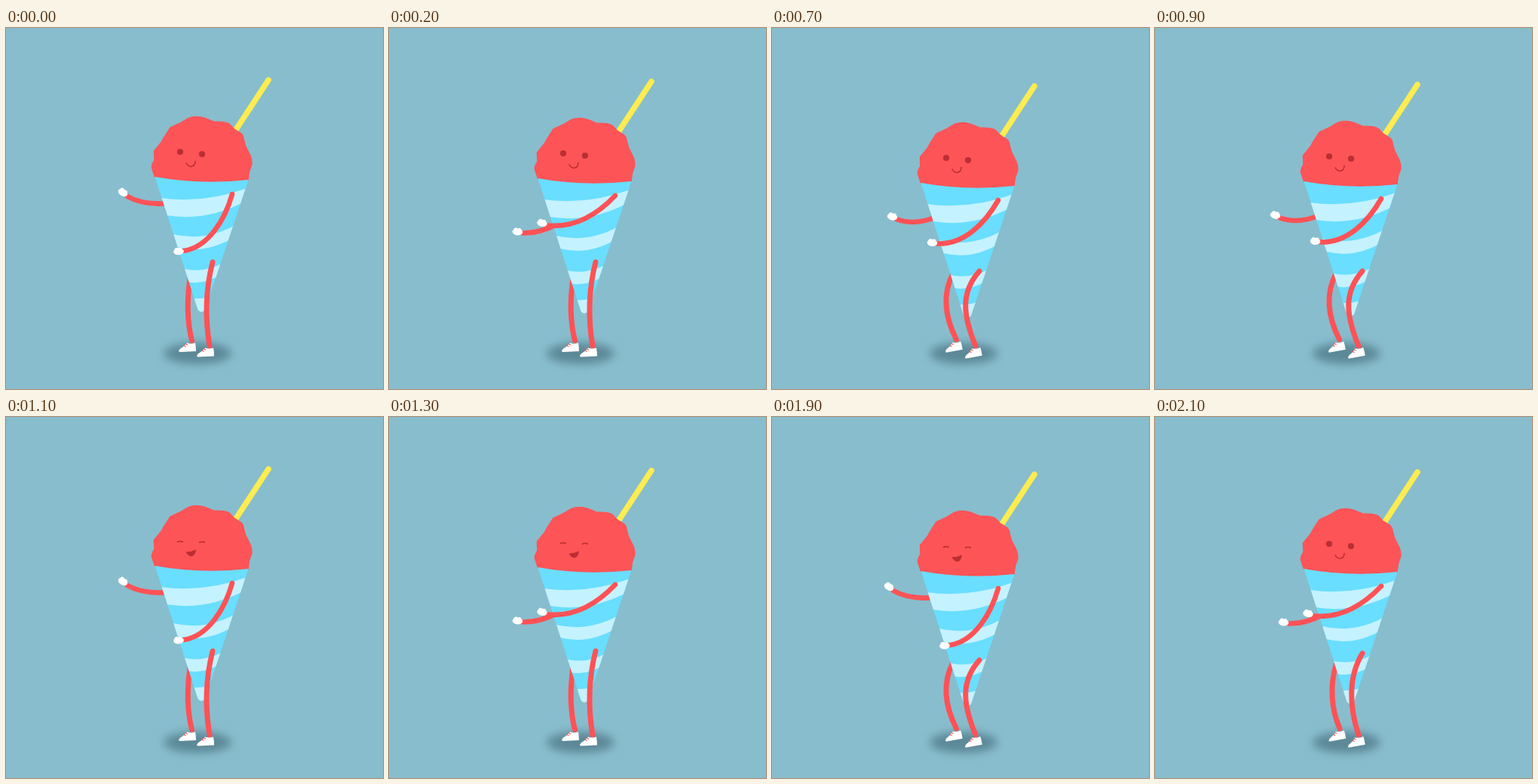
These frames come from a looping animation (500 px wide and 478 px high, 2200 ms). An HTML page:

```html
<!DOCTYPE html>
<html lang="en">
<head>
<meta charset="utf-8">
<title>Dancing snow cone</title>
<style>
  html, body { margin: 0; width: 100%; height: 100%; overflow: hidden; background: #88bdcd; }
  svg { display: block; width: 100vw; height: 100vh; }
  .limb { fill: none; stroke: #fe5256; stroke-width: 7; stroke-linecap: round; }
  .arm { stroke-width: 6.6; }
  .stripe { fill: #c5f2ff; }
  .line { fill: none; stroke: #b92d33; stroke-width: 1.5; stroke-linecap: round; }
  .dark { fill: #b92f34; }
</style>
</head>
<body>
<svg viewBox="0 0 500 478" preserveAspectRatio="none">
  <defs>
    <filter id="soft" x="-30%" y="-80%" width="160%" height="260%"><feGaussianBlur stdDeviation="6"/></filter>
    <clipPath id="coneShape"><path id="cone" d="M197.5 197Q258 208 321.5 201L264 373Q259 379 254.5 373Z"/></clipPath>
    <g id="hand" fill="#fff">
      <ellipse rx="6.8" ry="4.5"/>
      <circle cx="-2.5" cy="-2.5" r="2.8"/>
      <circle cx="2.3" cy="-2.7" r="2.4"/>
    </g>
    <g id="shoe">
      <path fill="#fff" d="M4 2Q5 7 5 13L-16 14C-19 14 -18 11 -15 9C-11 7 -9 4 -7 2Q-2 4 4 2Z"/>
      <path d="M-11.5 5l3 2M-9 3l3 2" fill="none" stroke="#fe5256" stroke-width="1.2"/>
    </g>
  </defs>

  <rect width="500" height="478" fill="#88bdcd"/>
  <ellipse cx="254" cy="431" rx="45" ry="14" fill="#5c8897" filter="url(#soft)"/>

  <path id="farLeg" class="limb"/>
  <use id="farShoe" href="#shoe"/>

  <g id="body">
    <path id="farArm" class="limb arm"/>
    <use id="farHand" href="#hand"/>
    <path d="M302 139L348 69" fill="none" stroke="#ffec50" stroke-width="7.6" stroke-linecap="round"/>
    <path fill="#fd5457" stroke="#fd5457" stroke-width="1.5" stroke-linejoin="round"
      d="M197.5 197L193.5 185Q193 181 197 175L196.5 163L203 155Q207 151 209 146L218 132L232 125.500L242 119.500Q252 115.500 264 119.500L275 124L286 124.500Q294 125 297 128L303 134.500L312 140Q315 143 315 147L317.500 156L324 169Q326 174 326 180L322.500 190L321 201Q258 208 197.500 197Z"/>
    <g id="awake">
      <circle class="dark" cx="231" cy="164" r="4.1"/>
      <circle class="dark" cx="260" cy="167" r="4.1"/>
      <path class="line" d="M239 179Q241.500 183.500 245.500 183.500Q251 182.500 251 176.500"/>
    </g>
    <g id="laughing">
      <path class="line" d="M227.500 165.500Q231 163.500 234.500 165.500M256.500 166Q260 164.500 263.500 166"/>
      <path class="dark" d="M238.500 178.500Q245 179 252 175.500Q251 184 246 184.500Q241 184 238.500 178.500Z"/>
    </g>
    <use href="#cone" fill="#69deff"/>
    <g clip-path="url(#coneShape)" class="stripe">
      <path d="M205 225Q262 233 320 212V228Q267 257 213 248Z"/>
      <path d="M221 273Q264 283 304 261V276Q266 300 227 290Z"/>
      <path d="M236 319Q262 325 288 311V325Q262 341 241 336Z"/>
      <path d="M246 358Q260 359 272 355V382H246Z"/>
    </g>
  </g>

  <path id="nearLeg" class="limb"/>
  <use id="nearShoe" href="#shoe"/>
  <g id="front">
    <path id="nearArm" class="limb arm"/>
    <use id="nearHand" href="#hand"/>
  </g>
</svg>
<script>
const STEP = 100, STEPS = 22;

// One dance bar is 11 steps; the face changes only in the second bar.
const bob = [0, -2, 2, 4, 5, 6, 7, 8, 7, 6, 4];
const armBeat = "UMDMUMDMUMD";
const legBeat = "SSSSBBCCCCB";

// Hands are [x, y, angle].
const arms = {
  U: { far: "M216 232Q182 235 161 223", farHand: [155, 218, 32],
       near: "M300 220C290 255 268 290 236 295", nearHand: [229, 296, -4] },
  M: { far: "M218 242Q190 254 166 245.5", farHand: [159.5, 242, 12],
       near: "M300 220C283 250 255 279 219 277.500", nearHand: [212.5, 276.5, 5] },
  D: { far: "M224 257Q200 270 178 269.500", farHand: [170.5, 268, 5],
       near: "M300 220C278 243 248 263 211 259.500", nearHand: [203, 256.5, 10] }
};
const legs = {
  S: { far: "M244 332C240 360 240 388 246.500 414", near: "M274 310C265 345 264 385 270 421",
       farShoe: [247, 415, 0], nearShoe: [271, 421.5, 0] },
  B: { far: "M241 325C231 355 234 388 245 412.500", near: "M275 313C255.500 345 258 385 270 421",
       farShoe: [246.5, 413.5, -8], nearShoe: [272, 421.5, -8] },
  C: { far: "M240 325C226 352 229 382 244.500 412.500", near: "M275 322C250 350 253 380 270 421",
       farShoe: [246, 413.5, -8], nearShoe: [272, 421.5, -8] }
};

const set = (id, name, value) => document.getElementById(id).setAttribute(name, value);
const place = (id, [x, y, angle]) => set(id, "transform", `translate(${x} ${y}) rotate(${angle})`);
const show = (id, on) => set(id, "visibility", on ? "visible" : "hidden");

function draw(step) {
  const beat = step % bob.length;
  const arm = arms[armBeat[beat]], leg = legs[legBeat[beat]];
  const laughing = step >= 11 && step < 20;

  for (const id of ["body", "front"]) set(id, "transform", `translate(0 ${bob[beat]})`);
  for (const side of ["far", "near"]) {
    set(side + "Arm", "d", arm[side]);
    set(side + "Leg", "d", leg[side]);
    place(side + "Hand", arm[side + "Hand"]);
    place(side + "Shoe", leg[side + "Shoe"]);
  }
  show("awake", !laughing);
  show("laughing", laughing);
}

const start = performance.now();
function tick() {
  draw(Math.floor((performance.now() - start) / STEP) % STEPS);
  requestAnimationFrame(tick);
}
tick();
</script>
</body>
</html>
```
